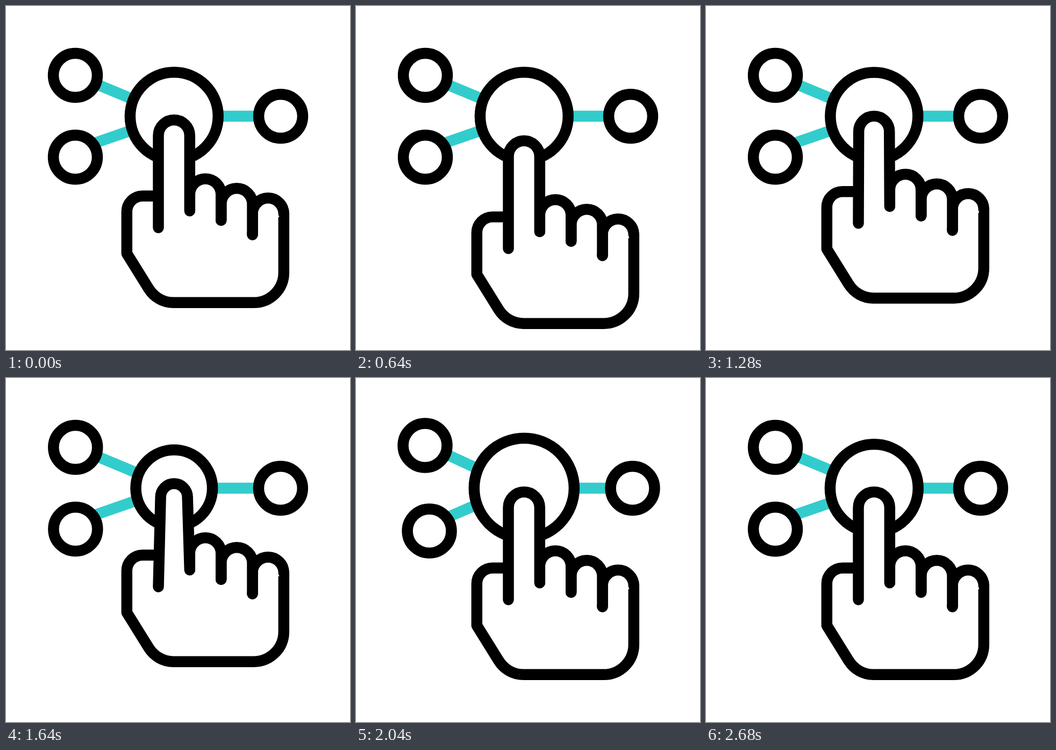
Recreate the animation shown at these times as an HTML page with a canvas. Size 640 by 640 pixels, loop 2760 ms.

```html
<!DOCTYPE html>
<html lang="en">
<head>
<meta charset="utf-8">
<title>Touch network</title>
<style>
  html, body { margin: 0; width: 100%; height: 100%; overflow: hidden; background: #fff; }
  canvas { display: block; width: 640px; height: 640px; }
</style>
</head>
<body>
<canvas id="stage" width="640" height="640"></canvas>
<script>
const ctx = document.getElementById('stage').getContext('2d');
const LOOP = 2760, STEP = 40;
const INK = '#000', TEAL = '#33cccc', LINE = 20.48;
const HUB = { x: 312.8, y: 205.1 };

// Cubic-bezier easing with horizontal tangents at both ends
function ease(x, x1 = 0.667, x2 = 0.333) {
  let lo = 0, hi = 1;
  for (let i = 0; i < 24; i++) {
    const t = (lo + hi) / 2, u = 1 - t;
    if (3 * u * u * t * x1 + 3 * u * t * t * x2 + t * t * t < x) lo = t; else hi = t;
  }
  return lo * lo * (3 - 2 * lo);
}

// keys: [time, value, x1, x2]; the easing belongs to the segment ending at that key
function track(time, keys) {
  if (time <= keys[0][0]) return keys[0][1];
  for (let i = 1; i < keys.length; i++) {
    const [t0, v0] = keys[i - 1], [t1, v1, x1, x2] = keys[i];
    if (time < t1) return v0 + (v1 - v0) * ease((time - t0) / (t1 - t0), x1, x2);
  }
  return keys[keys.length - 1][1];
}

const handShift = t => track(t, [[80, 0], [800, 40.96], [1600, -24.3], [2000, 0]]);
const squeeze = t => track(t, [[1120, 0], [1600, 1], [2000, 0]]);
const hubRadius = t => track(t, [[1200, 81.92], [1600, 71.1], [2000, 93.1], [2560, 81.92]]);
const nodeOffset = (t, pull, push) =>
  track(t, [[1600, 0], [1880, pull], [2280, push], [2680, 0, 0.21, 0.4]]);

// pull / push: inward and outward travel; grip: link end on the node; root: link end under the hub
const nodes = [
  { x: 129, y: 129, pull: [12.6, 3.8], push: [-41, -26], grip: [42, 17.5], root: [242, 176] },
  { x: 129, y: 281.2, pull: [18.4, -1.8], push: [-26.1, 19.7], grip: [34, -25.5], root: [240, 229] },
  { x: 511, y: 205.1, pull: [-8.7, 0], push: [41.2, 0], grip: [-42, 0], root: [375, 205.1] }
];

function ring(x, y, r) {
  ctx.beginPath();
  ctx.arc(x, y, r, 0, Math.PI * 2);
  ctx.fill();
  ctx.stroke();
}

// Fingertip: up the left side, round the top, down the right side
function finger(left, leftY, right, rightY, tipY, inset = 0) {
  const mid = (left + right) / 2, r = (right - left) / 2 - inset;
  ctx.beginPath();
  ctx.moveTo(left, leftY);
  ctx.lineTo(mid - r, tipY);
  ctx.arc(mid, tipY, r, Math.PI, 0);
  ctx.lineTo(right, rightY);
  ctx.fill();
  ctx.stroke();
}

function palm() {
  ctx.beginPath();
  ctx.moveTo(283.5, 353.5);
  ctx.lineTo(254, 353.5);
  ctx.arcTo(224.8, 353.5, 224.8, 382.7, 29.2);
  ctx.lineTo(224.8, 460.5);
  ctx.lineTo(265.2, 525.5);
  ctx.bezierCurveTo(275.5, 542, 292.5, 551.8, 311.5, 551.8);
  ctx.lineTo(461, 551.8);
  ctx.arcTo(516.8, 551.8, 516.8, 496, 55.8);
  ctx.lineTo(516.8, 386.5);
  ctx.fill();
  ctx.stroke();
}

function hand(t) {
  const s = squeeze(t);
  ctx.save();
  ctx.translate(0, handShift(t));
  palm();
  finger(458.5, 425.5, 516.8, 386.5, 386.5);
  finger(400.2, 398.8, 458.5, 425.5, 368.5);
  finger(341.8, 381, 400.2, 398.8, 350.6);
  finger(283.5, 412.5, 341.8, 381, 241.1 + 4.6 * s, 4.2 * s);
  ctx.restore();
}

function draw(t) {
  ctx.fillStyle = '#fff';
  ctx.fillRect(0, 0, 640, 640);
  ctx.lineWidth = LINE;
  ctx.lineJoin = 'round';

  const placed = nodes.map(n => ({
    ...n,
    x: n.x + nodeOffset(t, n.pull[0], n.push[0]),
    y: n.y + nodeOffset(t, n.pull[1], n.push[1])
  }));

  ctx.strokeStyle = TEAL;
  ctx.lineCap = 'butt';
  for (const n of placed) {
    ctx.beginPath();
    ctx.moveTo(n.x + n.grip[0], n.y + n.grip[1]);
    ctx.lineTo(...n.root);
    ctx.stroke();
  }

  ctx.strokeStyle = INK;
  ctx.lineCap = 'round';
  ring(HUB.x, HUB.y, hubRadius(t));
  for (const n of placed) ring(n.x, n.y, 40.96);
  hand(t);
}

const start = performance.now();
function tick() {
  const t = (performance.now() - start) % LOOP;
  draw(Math.floor(t / STEP) * STEP);
  requestAnimationFrame(tick);
}
tick();
</script>
</body>
</html>
```
